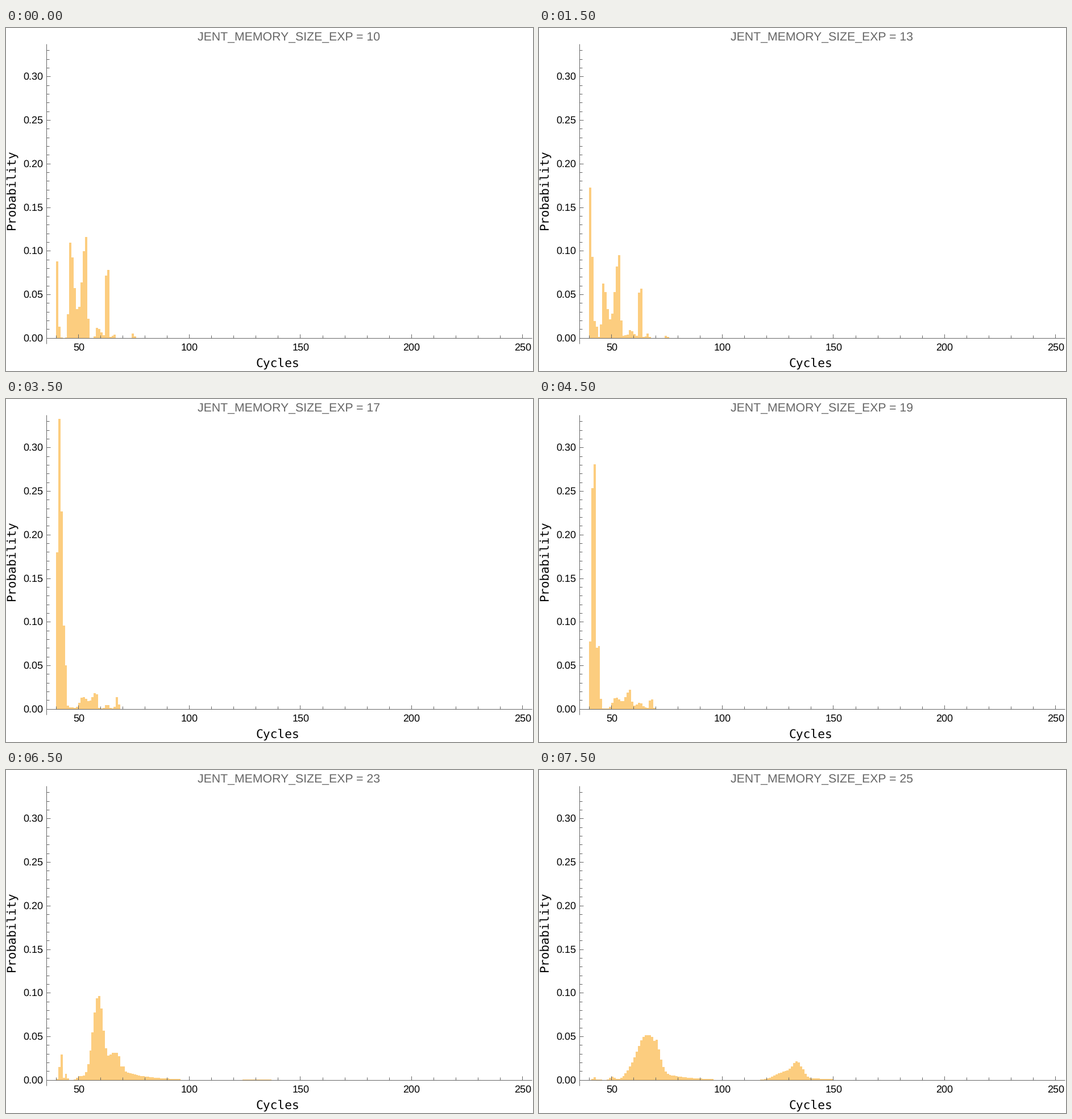
A matplotlib script that plays this animation: 927x604 px, repeating every 8 s.

```python
import matplotlib.pyplot as plt
import numpy as np
from matplotlib.animation import FuncAnimation

plt.rcParams["text.hinting"] = "none"

W, H, DPI = 927, 604, 64
PT = 72 / DPI  # points per pixel
GREY = "#666666"
X0, Y0 = 71.3, 545.8

cycles = np.arange(40, 161)
edges = np.arange(40, 162)


def px(c):
    return 127 + (c - 50) * 3.905


def py(p):
    return Y0 - p * 1535


def rise(e, mid, width):
    return 1 / (1 + np.exp((mid - e) / width))


def fall(e, mid, width):
    return 1 - rise(e, mid, width)


def peak(centre, left, right, height, power=2):
    """Bell with its own width on each side."""
    d = cycles - centre
    spread = np.where(d < 0, left, right)
    return height * np.exp(-np.abs(d / spread) ** power / 2)


def tail(start, height, scale):
    t = height * np.exp(-(cycles - start) / scale)
    return np.where((cycles >= start) & (t > 1), t, 0)


# Heights below are in thousandths.
def fast_hits(e, c):
    width = 0.45 + 0.4 * np.exp(-((e - 16.5) / 3) ** 2 / 2)
    top = 345 * (0.25 + 0.75 * rise(e, 13.4, 0.7)) * fall(e, 21, 0.85)
    return (peak(c, width + 0.25, width, top)
            + peak(c + 2.1, 0.4, 0.65, 0.24 * top * rise(e, 13, 0.7)))


def small_memory(e):
    late = fall(e, 13.7, 0.75)
    return (peak(46, 0.6, 1.7, 113) * fall(e, 13.2, 0.95)
            + peak(53, 1.8, 0.55, 116) * fall(e, 13.9, 0.65)
            + (peak(62.52, 0.45, 0.45, 138) + peak(58, 0.5, 1.8, 12)
               + peak(66, 1, 0.4, 4)) * late
            + peak(74, 0.3, 0.75, 5) * fall(e, 13, 1))


def mid_memory(e, c):
    weight = rise(e, 14, 0.6) * fall(e, 22, 0.5)
    return weight * (peak(51.5, 1.3, 2, 13)
                     + peak(c + 16.5, 1.9, 0.5, 19)
                     + peak(62.5, 1, 1, 4)
                     + peak(c + 25.9, 0.6, 0.6, 14))


def large_memory(e):
    g = np.clip(e - 21, 0, 2)
    wide = 2.8 + 0.9 * np.clip(e - 23, 0, 2)
    first = 108 * rise(e, 21, 0.6) * fall(e, 24.1, 0.45)
    return (peak(60 - 0.6 * g, 4 - 0.7 * g, 3.5 - 0.7 * g, first)
            + peak(66.2, wide, wide - 0.3, 52 * rise(e, 22.8, 0.5), 3)
            + peak(50, 1, 1, 4) * rise(e, 22, 0.5)
            + tail(70, 10 * rise(e, 21, 0.5), 11))


def slow_misses(e):
    weight = rise(e, 24.2, 0.35)
    return (weight * (peak(133.5, 2.3, 2, 22) + peak(127.5, 4, 3, 10))
            + tail(136, 3 * weight, 13))


def histogram(e):
    c = 40 + 1.9 * rise(e, 16, 1.6)
    total = (fast_hits(e, c) + small_memory(e) + mid_memory(e, c)
             + large_memory(e) + slow_misses(e))
    return total / 1000


fig = plt.figure(figsize=(W / DPI, H / DPI), dpi=DPI, facecolor="white")
ax = fig.add_axes([0, 0, 1, 1])
ax.set_xlim(0, W)
ax.set_ylim(H, 0)
ax.axis("off")


def line(xs, ys):
    ax.plot(xs, ys, color=GREY, lw=PT, snap=True,
            solid_capstyle="butt", zorder=3)


def label(x, y, text, size, font="Liberation Sans", **kw):
    opts = dict(color="black", ha="center", va="baseline")
    opts.update(kw)
    return ax.text(x, y, text, fontsize=size * PT, fontfamily=font, **opts)


line([X0, 925], [Y0, Y0])
line([X0, X0], [28, 556])

for c in range(40, 251, 10):
    major = c % 50 == 0
    line([px(c)] * 2, [Y0, Y0 - (7 if major else 4.5)])
    if major:
        label(px(c) + 0.8, 567.4, str(c), 18)

for n in range(34):
    y = py(n / 100)
    major = n % 5 == 0
    line([X0, X0 + (7 if major else 4.5)], [y, y])
    if major:
        label(65.7, y + 5.8, f"{n / 100:.2f}", 18, ha="right")

label(478, 597, "Cycles", 21.3, "DejaVu Sans Mono")
label(16, 285, "Probability", 21.3, "DejaVu Sans Mono",
      rotation=90, rotation_mode="anchor")

title = label(337, 22, "", 21.3, color=GREY, ha="left")
bars = ax.stairs(py(histogram(10)), px(edges), baseline=Y0,
                 fill=True, color="#fccd7f", lw=0, zorder=2)


def draw(i):
    e = 10 + i
    bars.set_data(values=py(histogram(e)))
    title.set_text(f"JENT_MEMORY_SIZE_EXP = {e}")
    return bars, title


anim = FuncAnimation(fig, draw, frames=16, interval=500, repeat=True,
                     repeat_delay=0, blit=False)
plt.show()
```
